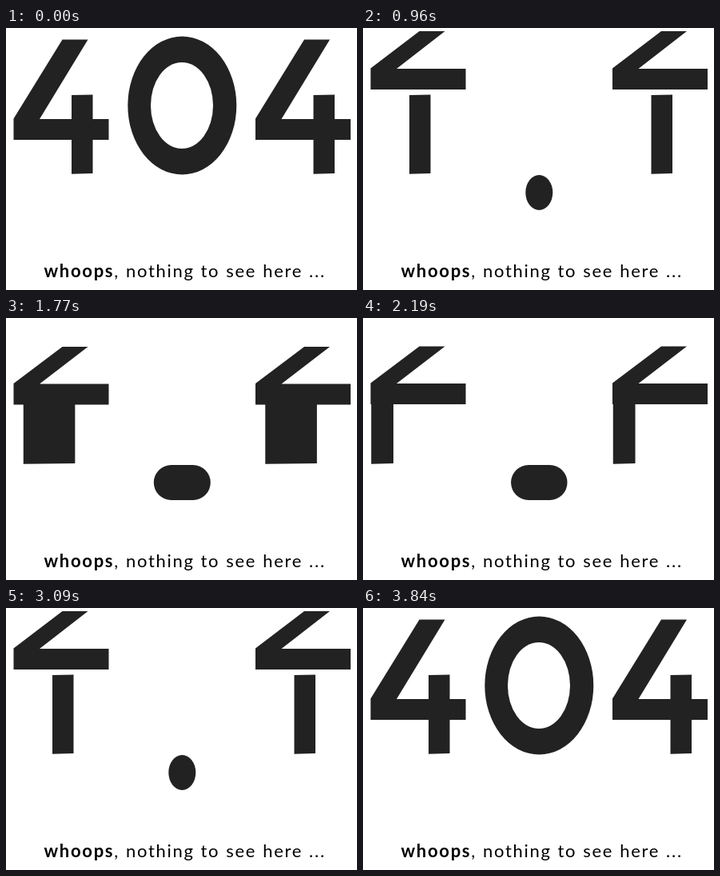
An HTML page that plays this animation: 439x328 px, repeating every 4.53 s.

```html
<!DOCTYPE html>
<html lang="en">
<head>
<meta charset="utf-8">
<title>404</title>
<style>
  html, body { margin: 0; width: 100%; height: 100%; overflow: hidden; background: #fff; }
  svg { display: block; width: 100%; height: 100%; }
  text { font: 22px Lato, "Open Sans", sans-serif; letter-spacing: 1.7px; word-spacing: .7px; }
</style>
</head>
<body>
<svg viewBox="0 0 439 328" fill="#222">
  <g id="eye"><path id="lid"/><path id="leg"/></g>
  <use href="#eye" x="302.5"/>
  <rect id="mouth"/>
  <ellipse id="hole" cx="220" fill="#fff"/>
  <text x="47.5" y="312" fill="#000"><tspan font-weight="700">whoops</tspan>, nothing to see here ...</text>
</svg>
<script>
const LOOP = 4530, STEP = 30;
const $ = id => document.getElementById(id);

// top, bar: lid heights; l, r: leg edges; y, w, h: mouth; hw, hh: hole
const digits = { top: 14.5, bar: 114, l: 82, r: 108.5, y: 97, w: 68, h: 86.5, hw: 39, hh: 54 };
const gasp = { top: 4, bar: 51, l: 58, r: 84.5, y: 206, w: 17, h: 22, hw: 0, hh: 0 };
const pinch = { ...gasp, l: 60, r: 82.5 };
const right = { ...gasp, top: 36, bar: 82.5, l: 101.5, r: 128.5, w: 35.5 };
const left = { ...right, l: 9.5, r: 36.5 };

const moves = [
  [600, 960, digits, gasp],
  [1170, 1500, gasp, right],
  [1710, 1890, right, left],
  [2160, 2700, left, gasp],
  [2700, 2790, gasp, pinch],
  [2910, 3090, pinch, gasp],
  [3450, 3840, gasp, digits]
];

const ease = (t, sharp) => 1 - (1 - t * t) ** sharp;
const back = t => 1 + 2.1 * (t - 1) ** 3 + 1.1 * (t - 1) ** 2;

// The leading edge of the leg runs ahead of the trailing one.
function progress(key, t, from, to) {
  if (key === 'l' || key === 'r') {
    const leads = (to[key] > from[key]) === (key === 'r');
    if (leads && to === left) return back(t);
    return ease(t, leads ? 10.5 : 5.2);
  }
  if (key === 'w') return ease(t, to === right ? 9 : 4.8);
  return ease(t, 6.2);
}

function pose(time) {
  let state = digits;
  for (const [start, end, from, to] of moves) {
    if (time < start) break;
    const t = Math.min(1, (time - start) / (end - start));
    state = {};
    for (const key in from)
      state[key] = from[key] + (to[key] - from[key]) * progress(key, t, from, to);
  }
  return state;
}

function set(id, attrs) {
  for (const name in attrs) $(id).setAttribute(name, attrs[name]);
}

function draw({ top, bar, l, r, y, w, h, hw, hh }) {
  set('lid', { d: `M70.5 ${top}H102.5L42 ${bar}H128.5V${bar + 26}H9.5V${bar - .5}Z` });
  set('leg', { d: `M${l} 84L${r} 83.5V182L${l} 182.7Z` });
  const corner = Math.min(w, h);
  set('mouth', {
    x: 220.3 - w, y: y - h, width: 2 * w, height: 2 * h,
    rx: corner, ry: h
  });
  set('hole', { cy: y, rx: hw, ry: hh });
}

function frame(now) {
  draw(pose(Math.floor(now % LOOP / STEP) * STEP));
  requestAnimationFrame(frame);
}
draw(digits);
requestAnimationFrame(frame);
</script>
</body>
</html>
```
